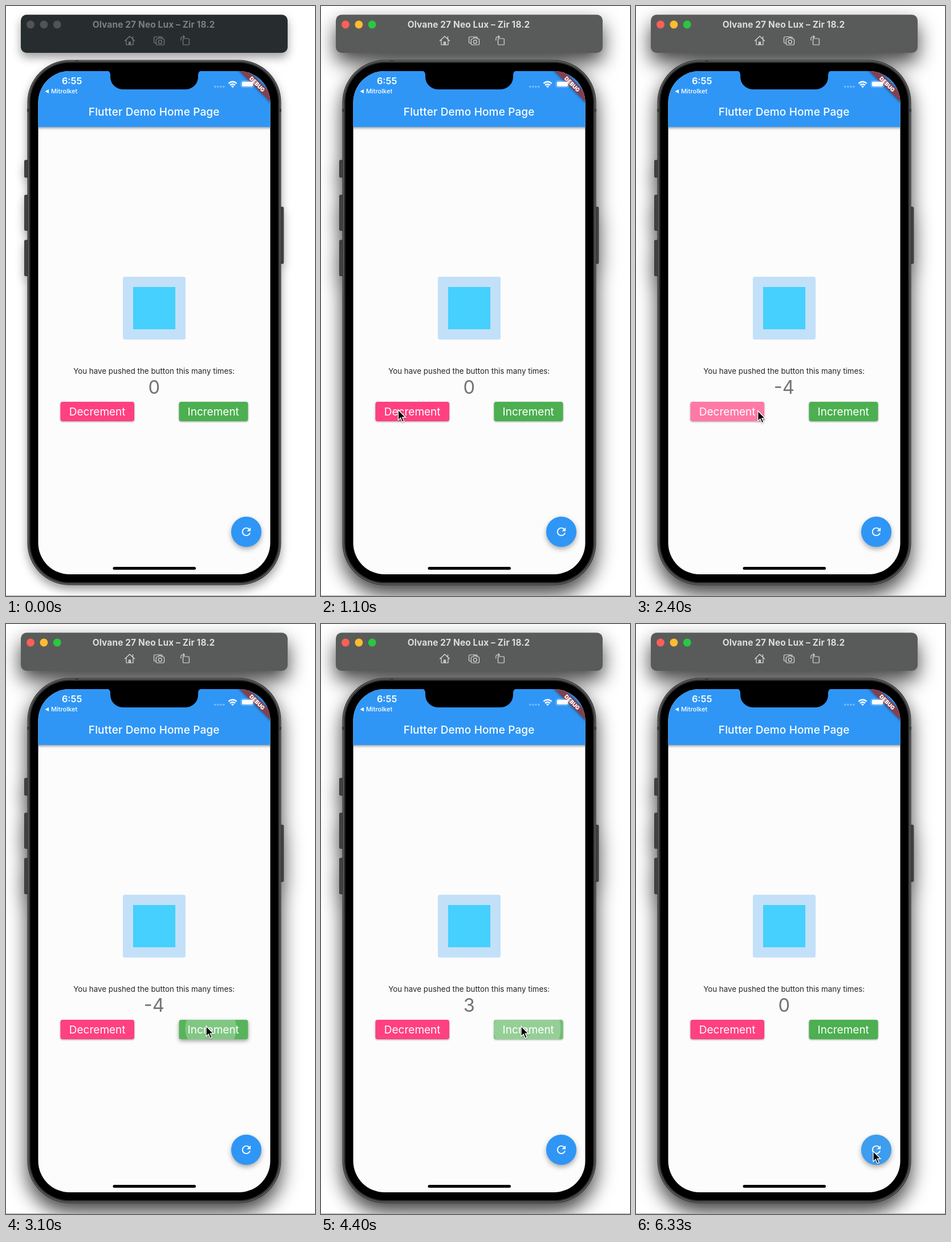
Recreate the animation shown at these times as an HTML page. Size 542 by 1033 pixels, loop 6.47 s.

```html
<!DOCTYPE html>
<html lang="en">
<head>
<meta charset="utf-8">
<title>Counter demo</title>
<style>
html, body { margin: 0; width: 100%; height: 100%; overflow: hidden; background: #fff; }
svg { display: block; width: 100vw; height: 100vh; font-family: Inter, Roboto, sans-serif; }
.mid { text-anchor: middle; }
#win { filter: drop-shadow(0 8px 8px rgba(0,0,0,.38)); }
.active #win { filter: drop-shadow(0 16px 17px rgba(0,0,0,.75)); }
#bar { fill: #272d2e; }
.active #bar { fill: #595b5b; }
#title { fill: #7b8081; font-weight: 700; font-size: 15.4px; letter-spacing: .15px; }
.active #title { fill: #dcdddd; }
#tools { fill: none; stroke: #7b8081; stroke-width: 1.2; stroke-linejoin: round; stroke-linecap: round; }
.active #tools { stroke: #dcdddd; }
.light { fill: #505455; }
.active .red { fill: #fe5f57; }
.active .amber { fill: #febc2e; }
.active .green { fill: #28c840; }
.face { filter: drop-shadow(0 1.6px 1.4px rgba(0,0,0,.36)); }
.down .face { filter: drop-shadow(0 3px 3.5px rgba(0,0,0,.38)); }
.glow { fill: #fff; opacity: 0; }
.lit .glow { opacity: .06; }
.label { fill: #fff; font-size: 19px; }
</style>
</head>
<body>
<svg id="stage" viewBox="0 0 542 1033" preserveAspectRatio="none">
  <defs>
    <clipPath id="screen"><rect x="56.5" y="114" width="407" height="881" rx="55"/></clipPath>
    <clipPath id="clipDec"><rect x="95.5" y="693" width="129.5" height="34" rx="3.8"/></clipPath>
    <clipPath id="clipInc"><rect x="303.5" y="693" width="121" height="34" rx="3.8"/></clipPath>
  </defs>
  <rect width="542" height="1033" fill="#fff"/>

  <g id="win">
    <rect id="bar" x="26" y="15.300" width="468" height="66.700" rx="10"/>
    <g fill="#414242" stroke="#222" stroke-width=".8">
      <rect x="32.5" y="270" width="7" height="30" rx="1.5"/>
      <rect x="32.5" y="331" width="7" height="62" rx="1.5"/>
      <rect x="32.5" y="410" width="7" height="62.5" rx="1.5"/>
      <rect x="480" y="352" width="6.8" height="99" rx="1.5"/>
    </g>
    <rect x="37.5" y="94.5" width="445" height="919.5" rx="74" fill="#2b2c2c"/>
    <rect x="38.6" y="95.6" width="442.8" height="917.3" rx="73" fill="#666767"/>
    <rect x="40" y="97" width="440" height="914.5" rx="71.5" fill="#333434"/>
    <rect x="42.5" y="99.5" width="435" height="909.5" rx="69" fill="#000"/>
    <path d="M121 97h6M38.5 180v5M481.5 180v5" stroke="#3a3b3b" stroke-width="3"/>
  </g>
  <path d="M0 1032.5H542" stroke="#a9a9a9"/>

  <circle class="light red" cx="43" cy="32.5" r="6.9"/>
  <circle class="light amber" cx="66.4" cy="32.5" r="6.9"/>
  <circle class="light green" cx="89.7" cy="32.5" r="6.9"/>
  <text id="title" class="mid" x="259" y="37.5">Olvane 27 Neo Lux – Zir 18.2</text>
  <g id="tools">
    <path d="M208.5 61l8.500-8 8.500 8M211 59.500V68h12v-8.500M222.500 57v-3.500M215.500 67.500v-4.500h3v4.500zM217 67v-4"/>
    <path d="M262.500 65h-1.200q-1.800 0-1.800-1.800v-7.400q0-1.800 1.800-1.800h11.400q1.800 0 1.800 1.800"/>
    <path d="M265 57.500h2l1.200-1.800h4l1.200 1.800h2.400q1.700 0 1.700 1.700v7.100q0 1.700-1.700 1.700H265q-1.700 0-1.700-1.700v-7.100q0-1.700 1.700-1.700z"/>
    <circle cx="270.300" cy="62.700" r="3"/>
    <rect x="310.500" y="57" width="10.800" height="11" rx="1.300"/>
    <path d="M306.800 60v-2.500q0-3.500 3.500-3.500h2.700M311 52l2.200 2-2.200 2"/>
  </g>

  <g clip-path="url(#screen)">
    <rect x="56" y="113" width="408" height="883" fill="#fcfcfc"/>
    <rect x="50" y="104" width="420" height="107.8" fill="#2f96f6" style="filter:drop-shadow(0 2px 2px rgba(0,0,0,.38))"/>
    <g transform="translate(463.5 114) rotate(45)">
      <rect x="-40" y="26.6" width="80" height="11.5" fill="#84404f" style="filter:drop-shadow(0 0 2.6px rgba(0,0,0,.55))"/>
      <text class="mid" y="35.9" font-size="9.6" font-weight="900" fill="#fff">DEBUG</text>
    </g>
  </g>
  <path d="M176 113a7 7 0 0 1 7 7v4a22 22 0 0 0 22 22H315a22 22 0 0 0 22-22v-4a7 7 0 0 1 7-7z"/>

  <g fill="#fff">
    <text x="98" y="136.7" font-size="16.2" font-weight="600">6:55</text>
    <path d="M68.5 149.500l6.500-3.400v6.800z"/>
    <text x="79" y="153.3" font-size="11" font-weight="500">Mitrolket</text>
    <text class="mid" x="259.700" y="191.8" font-size="19" font-weight="500" letter-spacing=".15">Flutter Demo Home Page</text>
    <g opacity=".38">
      <circle cx="366.8" cy="141.3" r="1.7"/><circle cx="371.8" cy="141.3" r="1.7"/>
      <circle cx="376.8" cy="141.3" r="1.7"/><circle cx="381.8" cy="141.3" r="1.7"/>
    </g>
    <path d="M397.500 143.200l-2.600-2.700q2.600-2 5.200 0z"/>
    <path d="M393 138.600q4.500-3.700 9 0M390.300 135.600q7.200-6.200 14.400 0" fill="none" stroke="#fff" stroke-width="2.3"/>
    <rect x="412" y="131" width="23" height="11.600" rx="3.5" fill="none" stroke="#fff" stroke-opacity=".4"/>
    <rect x="413.700" y="132.600" width="19.600" height="8.400" rx="2.2"/>
  </g>

  <rect x="205" y="474" width="110" height="110" rx="3.5" fill="#c3e0f9"/>
  <rect x="223" y="492" width="74" height="74" fill="#45d0fd"/>
  <text class="mid" x="259.700" y="644.3" font-size="13.3" letter-spacing=".03" fill="#252525">You have pushed the button this many times:</text>
  <text id="count" class="mid" x="259.700" y="679" font-size="32.6" fill="#737373">0</text>

  <g id="dec">
    <rect class="face" x="95.5" y="693" width="129.5" height="34" rx="3.8" fill="#ff4081"/>
    <g clip-path="url(#clipDec)"><rect class="glow" x="95" y="692" width="131" height="36"/><g class="ink"></g></g>
    <text class="label mid" x="160.2" y="716.8">Decrement</text>
  </g>
  <g id="inc">
    <rect class="face" x="303.5" y="693" width="121" height="34" rx="3.8" fill="#4caf50"/>
    <g clip-path="url(#clipInc)"><rect class="glow" x="303" y="692" width="122" height="36"/><g class="ink"></g></g>
    <text class="label mid" x="363.7" y="716.8">Increment</text>
  </g>

  <circle id="fab" cx="421.5" cy="920.5" r="26.6" fill="#2f96f6" style="filter:drop-shadow(0 4px 4px rgba(0,0,0,.32))"/>
  <path transform="translate(410.1 909.1) scale(.951)" fill="#fff" d="M17.65 6.35C16.2 4.9 14.21 4 12 4c-4.42 0-7.99 3.58-7.99 8s3.57 8 7.99 8c3.73 0 6.84-2.55 7.73-6h-2.08c-.82 2.33-3.04 4-5.65 4-3.31 0-6-2.69-6-6s2.69-6 6-6c1.66 0 3.14.69 4.22 1.78L13 11h7V4l-2.35 2.35z"/>
  <rect x="187.5" y="982" width="145.5" height="5" rx="2.5"/>

  <g id="arrow">
    <path transform="scale(1.05)" d="M0 0V17.300l4-3.700 2.900 6.800 2.900-1.300-2.900-6.500h5.500z" stroke="#fff" stroke-width="1.3" style="filter:drop-shadow(0 1px 1px rgba(0,0,0,.3))"/>
  </g>
</svg>
<script>
const LOOP = 6470, TICK = 100, HOLD = 210, RESET = 6330, FOCUS = 1000;
const $ = id => document.getElementById(id);
const stage = $('stage'), count = $('count'), arrow = $('arrow'), fab = $('fab');

// cursor tip: time, x, y
const path = [
  [100, 230, 820], [600, 133, 706], [1000, 133, 706], [1500, 145, 711],
  [2200, 145, 711], [2800, 351, 704], [5100, 351, 704], [5300, 380, 770],
  [5600, 409, 938], [6000, 416, 923]
];

const buttons = [
  { id: 'dec', step: -1, mid: 160, tap: [145, 711], presses: [1180, 1510, 1850, 2050] },
  { id: 'inc', step: 1, mid: 364, tap: [351, 704],
    presses: [2900, 3160, 3330, 3500, 3690, 3920, 4140, 4410, 4560, 4710, 5070] }
];

for (const b of buttons) {
  b.el = $(b.id);
  const ink = b.el.querySelector('.ink');
  b.drops = b.presses.map(() => {
    const c = document.createElementNS('http://www.w3.org/2000/svg', 'circle');
    c.setAttribute('fill', '#fff');
    return ink.appendChild(c);
  });
}

const clamp = v => Math.max(0, Math.min(1, v));
const mix = (a, b, k) => a + (b - a) * k;

function cursorAt(t) {
  let i = 0;
  while (i < path.length - 2 && t > path[i + 1][0]) i++;
  const [a, b] = [path[i], path[i + 1]];
  const k = clamp((t - a[0]) / (b[0] - a[0]));
  return [mix(a[1], b[1], k), mix(a[2], b[2], k)];
}

function drawButton(b, t) {
  const within = ms => b.presses.some(p => t >= p && t < p + ms);
  b.presses.forEach((p, i) => {
    const age = t - p, drop = b.drops[i];
    const r = age < 0 ? 0 : Math.min(70, age * .225), k = r / 70;
    drop.setAttribute('r', r);
    drop.setAttribute('cx', mix(b.tap[0], b.mid, k));
    drop.setAttribute('cy', mix(b.tap[1], 710, k));
    drop.setAttribute('opacity', .25 * clamp((600 - age) / 200));
  });
  b.el.classList.toggle('down', within(250));
  b.el.classList.toggle('lit', within(280));
}

function draw(t) {
  const reset = t >= RESET;
  let n = 0;
  for (const b of buttons) {
    drawButton(b, t);
    n += b.step * b.presses.filter(p => p + HOLD <= t).length;
  }
  count.textContent = reset ? 0 : n;
  fab.setAttribute('fill', reset ? '#3d9dee' : '#2f96f6');
  stage.classList.toggle('active', t >= FOCUS);
  arrow.setAttribute('visibility', t < path[0][0] ? 'hidden' : 'visible');
  arrow.setAttribute('transform', `translate(${cursorAt(t)})`);
}

const start = performance.now();
function frame() {
  const t = (performance.now() - start) % LOOP;
  draw(t >= RESET ? RESET : Math.floor(t / TICK) * TICK);
  requestAnimationFrame(frame);
}
frame();
</script>
</body>
</html>
```
